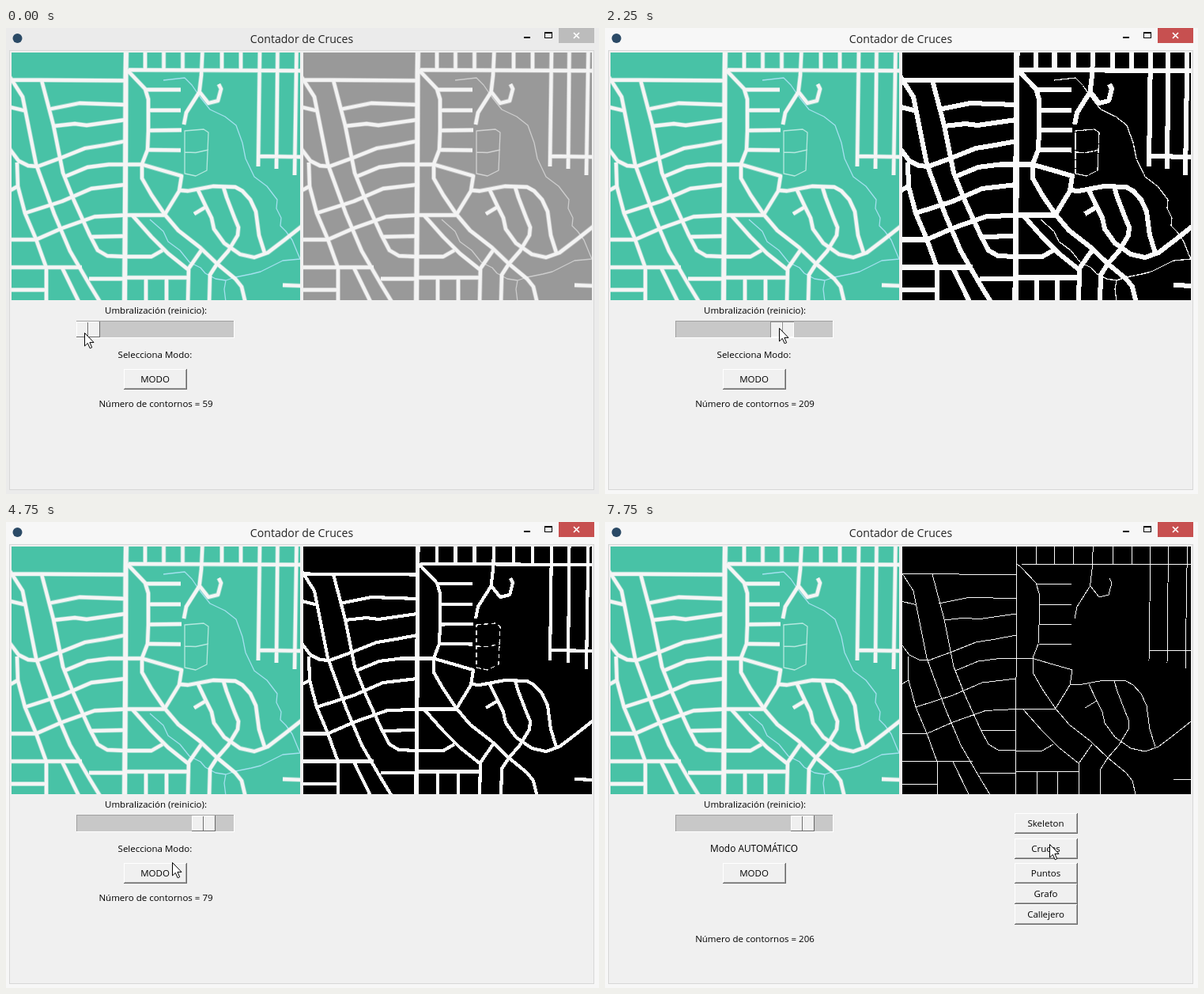
Write an HTML page that moves like this. It is 750 px wide and 589 px high and loops after 8 s.

```html
<!DOCTYPE html>
<html lang="es">
<head>
<meta charset="utf-8">
<title>Contador de Cruces</title>
<style>
html, body { margin: 0; width: 100%; height: 100%; overflow: hidden; }
svg { display: block; width: 100vw; height: 100vh; }
text { font: 11.5px "Open Sans", "Noto Sans", sans-serif; text-anchor: middle; fill: #000; }
.title { font-size: 14.1px; fill: #222; }
.map { fill: none; stroke-linejoin: round; }
.roads { stroke-width: calc(var(--w) * 1px); }
.wide { stroke-width: calc(var(--w) * 1px + var(--x) * 1px); }
.water, .court { stroke-width: 1.3; }
.crisp { shape-rendering: crispEdges; }
</style>
</head>
<body>
<svg viewBox="0 0 750 589" preserveAspectRatio="none">
<defs>
  <clipPath id="area"><rect x="7" y="31" width="365" height="313"/></clipPath>
  <clipPath id="lower"><rect x="7" y="48" width="365" height="296"/></clipPath>
  <g id="roads" class="roads">
    <path class="wide" d="M152 28L151.500 60L151 200L150 348"/>
    <!-- west -->
    <path d="M4 65.500L151 66.500M5 62L21 87L38 172L61 235L81 282L106 325L120 348"/>
    <path d="M45 66L60 123L72 183L86 218L106 262L116 281L128 288L151 289H184L198 281"/>
    <path d="M53 103L93 95L151 97M60 124L87 121L102 123L151 116"/>
    <path d="M4 152L16 168L28 174L40 175L70 164L100 152L125 148L151 143"/>
    <path d="M74 188L103 176L130 172.500H172L222 187L219 206L200 237"/>
    <path d="M24 234L71 219L108 203L151 198M4 206L15 200M5 100L24 104.500"/>
    <path d="M14 170L15 200L24 234L38 267L51 303V348"/>
    <path d="M4 267.500H38L71 253L112 238.500L151 236.500H200M106 264L151 263"/>
    <path d="M4 302.500H96M4 331H51M71 303L93 348M105 317H151"/>
    <!-- centre -->
    <path d="M152 53L157 57L176 77L180 90V130L179 154L172 172V190L184 211L201 236L218 256L245 277L267 298L290 317L298 327L303 348"/>
    <path d="M177 78H221M181 104H221M181 129.500L222 129M179 154L221 154.500"/>
    <path d="M160 237L184 264L205 285L230 305M247 281L231 304L230 348M151 315.500H230M177 315V348M203 315V348"/>
    <!-- east -->
    <path d="M155 53L376 54M176 28V53M199.500 28V53M223.500 28V53M273 28V53M297 28V53"/>
    <path d="M321 28L319 175M343.500 28L342 178M367.500 28L365 186M319 162L376 163"/>
    <path d="M248.500 28L247 60L244.500 81L228 107L225 122M245 81L256 95L268 92L272 77L269 71"/>
    <path d="M219 205L230 206L262 200L290 201L299 206L309 217L316 232L320 262L327 284"/>
    <path d="M243 205L253 226L260 240L263 254L276 272L296 286L314 290L331 284L352 268L376 249M238 235L253 226"/>
    <path d="M275 201L279 214L289 240L294 252L293 262L281 282L267 298L258 312L257 348M350 325L376 326"/>
  </g>
  <g id="water" class="water">
    <path d="M199 66L226 63L235 72L246 88L258 103L277 112L291 123L299 145L303 165L314 188L330 200L343 217L342 228L348 240L347 250L354 257L362 268L369 285L372 292L350 294L322 308L310 311L290 315L278 319L265 317L252 310L246 303L232 296L220 281L205 270L199 257L182 242M278 319L276 330L278 346"/>
  </g>
  <g id="court" class="court">
    <path d="M226 130L250 128L256 132L254 180L240 187L226 184ZM226 157L240 157.500L256 154"/>
  </g>
</defs>

<rect id="frame" width="750" height="589"/>
<rect x="4.500" y="28.500" width="739" height="555" fill="#f0f0f0" stroke="#d7d7d7"/>
<circle cx="14.500" cy="13" r="6" fill="#2b4a66"/>
<text class="title" x="374" y="18.500">Contador de Cruces</text>
<g class="crisp" fill="#000">
  <rect x="655" y="11" width="8" height="2"/>
  <path fill-rule="evenodd" d="M681 5H691V13H681ZM682 7V12H690V7Z"/>
</g>
<rect id="close" x="699" width="45" height="19"/>
<path d="M718 6L725 13M725 6L718 13" stroke="#fff" stroke-width="1.700"/>

<g class="map" clip-path="url(#area)">
  <rect x="7" y="31" width="365" height="313" fill="#48c2a6"/>
  <use href="#water" stroke="#a3e0ee"/>
  <use href="#court" stroke="#b5e8df"/>
  <use href="#roads" stroke="#f5f5f5" opacity=".4" style="--w:6;--x:1.500"/>
  <use href="#roads" stroke="#f5f5f5" style="--w:4.300;--x:1.500"/>
</g>
<g transform="translate(369)"><g id="result" class="map" clip-path="url(#area)">
  <rect id="ground" x="7" y="31" width="365" height="313"/>
  <use id="river" href="#water"/>
  <use id="field" href="#court"/>
  <use id="halo" href="#roads"/>
  <use id="core" href="#roads"/>
</g></g>

<text x="189.500" y="361">Umbralización (reinicio):</text>
<g class="crisp">
  <rect x="89" y="370" width="199" height="21" fill="#c8c8c8"/>
  <path d="M89.500 391V370.500H288" fill="none" stroke="#a0a0a0"/>
  <path d="M89 391.500H288.500V370" fill="none" stroke="#fff"/>
  <g id="slider">
    <rect width="30" height="20" y="371" fill="#f0f0f0"/>
    <path id="lit" fill="none"/>
    <path id="dark" fill="none"/>
  </g>
</g>
<text id="mode" x="188.500" y="417"></text>
<g id="buttons"></g>
<text id="count" x="189.500"></text>
<path id="cursor" d="M.5 .5V17L4.300 13.400L7.200 19.800L9.700 18.700L6.900 12.400H12Z" fill="#fff" stroke="#000"/>
</svg>
<script>
const LOOP = 8000;
const $ = id => document.getElementById(id);
const set = (id, attrs) => {
  for (const k in attrs) $(id).setAttribute(k, attrs[k]);
};

// Each track holds [start time, value...] and keeps its value until the next entry.
const sliderTrack = [[0, 89], [500, 106], [750, 162], [1000, 187], [1250, 204], [1500, 206],
  [1750, 209], [2500, 218], [2750, 225], [3000, 228], [3250, 231], [3500, 235]];
const cursorTrack = [[0, 99, 385], [250, 98, 384], [500, 130, 383], [750, 178, 395],
  [1000, 200, 388], [1250, 212, 380], [1500, 215, 380], [1750, 218, 380], [2250, 220, 379],
  [2500, 229, 380], [2750, 236, 380], [3000, 239, 380], [3250, 243, 380], [3500, 247, 380],
  [4750, 210, 430], [5000, 212, 437], [5250, 214, 433], [5500, 266, 461], [5750, 564, 390],
  [6000, 561, 374], [7750, 562, 407]];
const countTrack = [[0, 59], [500, 0], [1000, 346], [1250, 220], [1500, 218], [1750, 209],
  [2500, 231], [2750, 168], [3000, 137], [3250, 92], [3500, 79], [6500, 206]];
const viewTrack = [[0, 'gray'], [500, 'blank'], [1000, 'specks'], [1250, 'binary'], [6500, 'skeleton']];

const at = (track, t) => track.filter(e => e[0] <= t).pop().slice(1);

function button(label, x, y, extra) {
  return `<g class="${extra ? 'extra' : ''}"><g class="crisp" fill="none">
    <rect x="${x}" y="${y}" width="80" height="26" fill="#f0f0f0"/>
    <path d="M${x + .5} ${y + 25}V${y + .5}H${x + 79}" stroke="#fff"/>
    <path d="M${x + 1} ${y + 24.5}H${x + 78.5}V${y + 1}" stroke="#a0a0a0"/>
    <path d="M${x} ${y + 25.5}H${x + 79.5}V${y}" stroke="#696969"/></g>
    <text x="${x + 39.5}" y="${y + 17}">${label}</text></g>`;
}
$('buttons').innerHTML = button('MODO', 149, 431) +
  [['Skeleton', 368], ['Cruces', 400], ['Puntos', 431], ['Grafo', 457], ['Callejero', 483]]
    .map(([label, y]) => button(label, 518, y, true)).join('');
const extras = document.querySelectorAll('.extra');

function stroke(id, color, width, more = {}) {
  set(id, { stroke: color, style: `--w:${width};--x:${more.x ?? 1.5}`,
    opacity: more.opacity ?? 1, 'stroke-dasharray': more.dash ?? 'none',
    'clip-path': more.clip ?? 'none' });
}

function drawResult(view, pos) {
  const white = '#fbfbfb';
  const ground = { gray: '#999', blank: '#f8f8f8', specks: '#f8f8f8' }[view] || '#000';
  set('ground', { fill: ground });
  set('result', { class: view === 'binary' || view === 'skeleton' ? 'map crisp' : 'map' });
  for (const id of ['river', 'field', 'halo', 'core']) stroke(id, 'none', 1);
  if (view === 'gray') {
    stroke('river', '#cdcdcd', 1);
    stroke('field', '#d2d2d2', 1);
    stroke('halo', '#f3f3f3', 6, { opacity: .4 });
    stroke('core', '#f3f3f3', 4.3);
  } else if (view === 'specks') {
    stroke('river', '#000', 1, { dash: '1 6' });
    stroke('halo', '#000', 9, { dash: '1 5 2 9', clip: 'url(#lower)' });
    stroke('core', '#f8f8f8', 6.8);
  } else if (view === 'binary') {
    // A higher threshold thins the roads and breaks up the faint lines.
    const k = (pos - 204) / 24;
    stroke('core', white, 6.4 - 1.75 * k, { x: 1.2 });
    stroke('field', white, 1, { dash: k ? `${12 - 5 * k} ${3 * k}` : 'none' });
    if (pos < 235) {
      stroke('river', white, 1, { dash: k ? `${30 * Math.max(0, 1 - k) ** 2 + 1.2} ${8 * k ** 2}` : 'none' });
    }
  } else if (view === 'skeleton') {
    stroke('core', white, 1, { x: 0 });
  }
}

function drawSlider(pos, pressed) {
  set('slider', { transform: `translate(${pos})` });
  const topLeft = 'M.5 391V371.500H30M15.500 372V390';
  const bottomRight = 'M0 390.500H29.500V371M14.500 372V390';
  set('lit', { d: pressed ? bottomRight : topLeft, stroke: '#fff' });
  set('dark', { d: pressed ? topLeft : bottomRight, stroke: pressed ? '#8c8c8c' : '#696969' });
}

function draw(t) {
  const [pos] = at(sliderTrack, t);
  const [x, y] = at(cursorTrack, t);
  const active = t >= 500;
  const auto = t >= 5250;
  set('frame', { fill: active ? '#f7f7f7' : '#ebebeb' });
  set('close', { fill: active ? '#c75050' : '#bcbcbc' });
  drawResult(at(viewTrack, t)[0], pos);
  drawSlider(pos, active && t < 4750);
  $('mode').textContent = auto ? 'Modo AUTOMÁTICO' : 'Selecciona Modo:';
  $('mode').style.fontSize = auto ? '11.9px' : '';
  $('count').textContent = `Número de contornos = ${at(countTrack, t)[0]}`;
  set('count', { y: auto ? 531 : 479 });
  extras.forEach(b => b.setAttribute('visibility', auto ? 'visible' : 'hidden'));
  set('cursor', { transform: `translate(${x} ${y})` });
}

let start;
function tick(now) {
  start ??= now;
  draw((now - start) % LOOP);
  requestAnimationFrame(tick);
}
draw(0);
requestAnimationFrame(tick);
</script>
</body>
</html>
```
